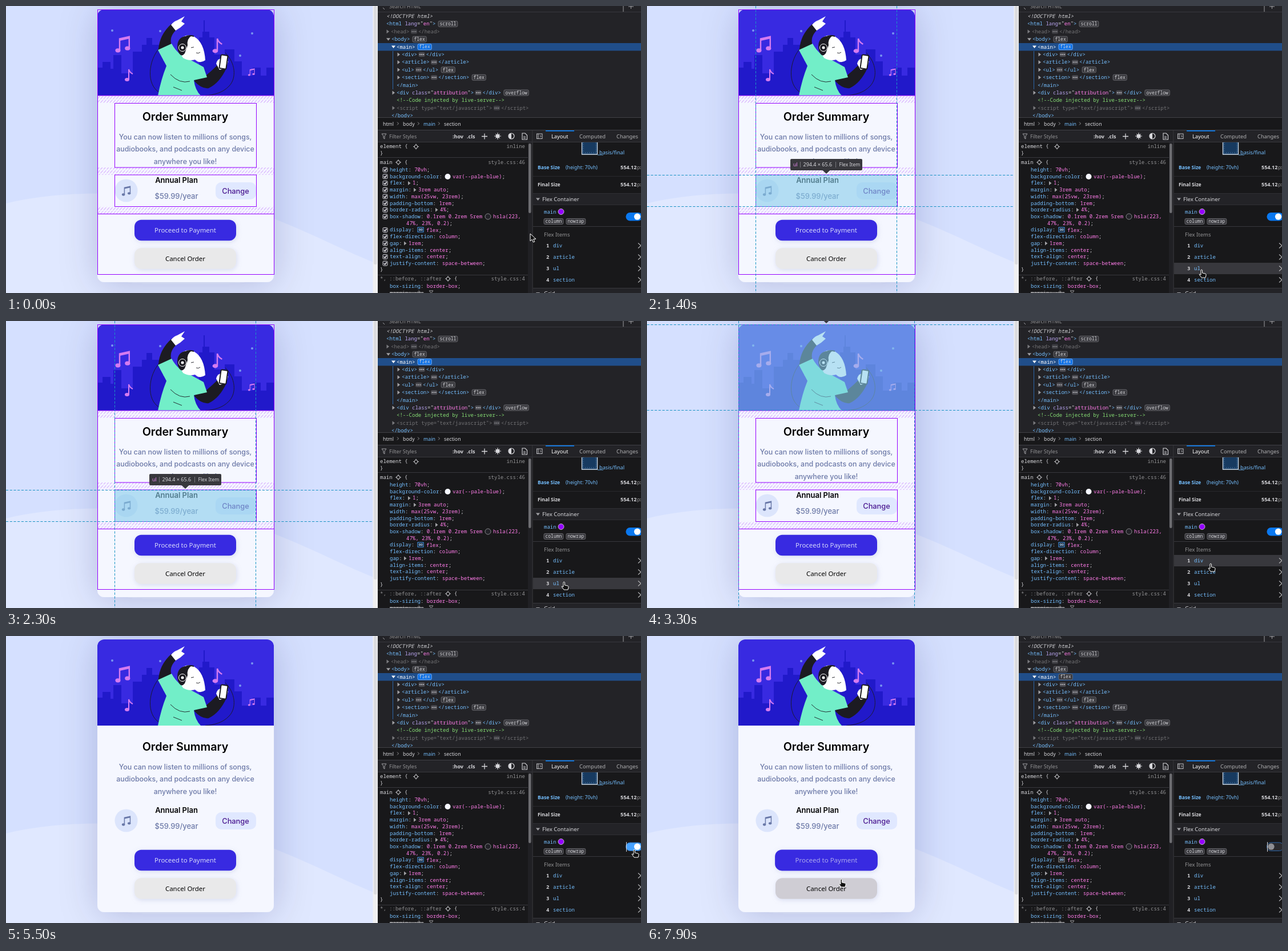
An HTML page for the animation above (8000 ms loop, 1112 by 503 pixels).

```html
<!DOCTYPE html>
<html lang="en">
<head>
<meta charset="utf-8">
<title>Flexbox inspector</title>
<style>
html, body { margin: 0; width: 100%; height: 100%; overflow: hidden; background: #18181a; }
svg { display: block; width: 1112px; height: 503px; }
text { white-space: pre; fill: #d7d7db; }
.mono { font: 9px "Noto Sans Mono", monospace; }
.tag { font: 8px "Noto Sans Mono", monospace; }
.ui { font: 9px "Noto Sans", sans-serif; }
.page { font: 500 12.4px Inter, sans-serif; text-anchor: middle; fill: #6d7aa8; }
.btn { font: 11.4px "Noto Sans", sans-serif; text-anchor: middle; }
</style>
</head>
<body>
<svg id="stage" viewBox="0 0 1112 503"></svg>
<script>
const COLORS = { b: '#75bfff', w: '#d7d7db', v: '#ff7de9', g: '#86de74', n: '#fff', d: '#939395', a: '#b9a4f0' };
const CHAR = 5.4;

const escapeText = s => s.replace(/&/g, '&amp;').replace(/</g, '&lt;');
const plain = s => s.replace(/~\w/g, '');
const rect = (x, y, w, h, fill, extra = '') =>
  `<rect x="${x}" y="${y}" width="${w}" height="${h}" fill="${fill}" ${extra}/>`;
const circle = (x, y, r, fill, extra = '') => `<circle cx="${x}" cy="${y}" r="${r}" fill="${fill}" ${extra}/>`;
const path = (d, fill = 'none', extra = '') => `<path d="${d}" fill="${fill}" ${extra}/>`;
const line = (d, color, width = 1, extra = '') => path(d, 'none', `stroke="${color}" stroke-width="${width}" ${extra}`);

// "~x" switches the colour of the following text.
function text(x, y, s, cls = 'mono', style = '') {
  const spans = s.split(/(?=~\w)/).map(part => part[0] === '~'
    ? `<tspan style="fill:${COLORS[part[1]]}">${escapeText(part.slice(2))}</tspan>` : escapeText(part));
  return `<text x="${x}" y="${y}" class="${cls}" style="${style}">${spans.join('')}</text>`;
}
const triangle = (x, y, open, fill = '#a0a0a4') => open
  ? path(`M${x - 3.5} ${y - 2}h7l-3.5 4.5z`, fill) : path(`M${x - 2} ${y - 3.5}v7l4.5 -3.5z`, fill);
const badge = (x, y, label, id = '') =>
  `<g ${id && `id="${id}"`}>` + rect(x, y - 5, label.length * 4.8 + 5, 10, '#38383d', 'rx="2" stroke="#77777c" stroke-width=".8"') +
  text(x + 2.5, y + 2.8, label, 'tag') + '</g>';

function note(x, y, scale, color, double) {
  const d = double
    ? 'M-5 8V-8L9 -11V5' : 'M0 9V-9Q2 -3 7 -1';
  return `<g transform="translate(${x} ${y}) scale(${scale})">` + line(d, color, 2) +
    (double ? line('M-5 -6.5L9 -9.5', color, 3) + `<ellipse cx="-7.5" cy="9" rx="3.8" ry="3" fill="${color}"/><ellipse cx="6.5" cy="6" rx="3.8" ry="3" fill="${color}"/>`
            : `<ellipse cx="-3" cy="9" rx="4" ry="3" fill="${color}"/>`) + '</g>';
}

function hero() {
  const ink = '#1c1b22', mint = '#72eec8', pink = '#d57bf0';
  return '<g clip-path="url(#cardClip)">' + rect(160, 6, 309, 151, '#382ae1') +
    path('M160 157V108H169V98H183V110H188V86H202V118H222V80H238V68H246V56H256V68H275V96H303V114H338V55H344V45H346V25H348V45H356V55H365V85H383V76H400V97H413V122H432V108H446V122H456V108H469V157Z', '#2119ca') +
    [[186, 43], [270, 44], [410, 87], [431, 48]].map(([x, y]) => circle(x, y, 2, '#7894f0')).join('') +
    note(205, 67, 1.2, pink, true) + note(215, 120, 1, pink) + note(370, 68, 1.2, pink) + note(430, 116, .55, pink, true) +
    line('M270 72C248 96 246 138 268 151C296 166 306 116 296 90M384 82C402 100 404 126 391 140C380 152 364 156 349 157', ink, .9) +
    path('M267 77Q268 51 290 31L298 42Q285 54 290 69L277 80Z', ink) +
    path('M289 33Q295 26 300 25L313 18L307 27L313 31Q306 38 297 43Z', '#fff') +
    path('M336 126L350 122Q362 112 373 101L386 109Q374 135 355 144Q343 146 329 131Z', ink) +
    path('M266 77L290 66Q302 88 324 95L346 107L352 125L329 130Q331 147 341 157H266Q272 127 281 105Z', mint) +
    path('M303 62Q313 46 330 54Q347 64 349 95Q339 102 331 94Q320 97 310 91Q300 76 303 62Z', '#fff') +
    path('M301 78Q297 57 313 53L325 52Q316 58 318 69L313 83Q306 92 301 78Z', ink) +
    line('M308 67Q311 48 329 53', ink, 2) + circle(309, 73, 6.5, ink, 'stroke="#fff" stroke-width="1"') + circle(309, 73, 2.5, '#fff') +
    line('M324 73l5 -1M333 82q4 2 7 -1M288 120q16 17 34 12M293 142l15 6', ink, .9) +
    path('M368 101Q370 92 378 92L389 97L385 109L374 112Z', '#fff') +
    rect(-6, -12, 12, 24, '#fff', `rx="2" stroke="${ink}" stroke-width="2" transform="translate(381 98) rotate(8)"`) +
    '</g>';
}

function page() {
  const button = (id, y, fill, label, color) => `<g id="${id}">` +
    rect(225, y, 178, 36.5, fill, 'rx="12" filter="url(#soft)"') + text(314, y + 22.6, label, 'btn', `fill:${color}`) + '</g>';
  return rect(0, 0, 643, 503, '#d5e0ff') +
    path('M0 346C60 331 130 327 200 329C320 333 400 346 470 373C540 401 590 428 643 449V503H0Z', '#e0e8ff') +
    rect(160, 6, 309, 478, '#f5f7ff', 'rx="12" filter="url(#cardShadow)"') + hero() +
    text(314, 201, 'Order Summary', 'page', 'font-size:19.7px;font-weight:600;fill:#000') +
    ['You can now listen to millions of songs,', 'audiobooks, and podcasts on any device', 'anywhere you like!']
      .map((s, i) => text(314, 234 + i * 21.3, s, 'page')).join('') +
    circle(210.5, 323.5, 20, '#dce5fc') + note(211, 324, .72, '#6978a8', true) +
    text(298.5, 310.3, 'Annual Plan', 'page', 'font-size:13px;font-weight:600;fill:#000') +
    text(298.5, 338, '$59.99/year', 'page', 'font-size:12.9px') +
    rect(367, 309, 71, 30, '#e0e8ff', 'rx="10"') + text(402, 328.5, 'Change', 'page', 'font-size:12.8px;fill:#4b1a91') +
    button('proceed', 374.7, '#382ae1', 'Proceed to Payment', '#d5d8fb') +
    button('cancel', 424.2, '#e9e9ea', 'Cancel Order', '#000') +
    rect(642.5, 0, 9, 503, '#f0f0f1') + rect(644, 0, 5.5, 453, '#dcdcdf', 'rx="2.5"');
}

function flexOverlay() {
  const boxes = [[160.5, 6.5, 309, 464], [160.5, 6.5, 309, 150.5], [190.5, 170.5, 248, 112.5], [190.5, 296, 248, 55.5], [160.5, 364.5, 309, 106]];
  return '<g id="flexLines">' +
    [157, 283, 351.5].map(y => rect(161, y, 308, 13, 'url(#hatch)')).join('') +
    boxes.map(b => rect(...b, 'none', 'stroke="#9400ff"')).join('') + '</g>';
}

function markup() {
  const rowY = i => 18 + i * 13.4;
  const node = (x, i, open, close, dim, tag) => {
    const y = rowY(i), dots = x + plain(open).length * CHAR + 2.5, end = dots + 13 + close.length * CHAR;
    return `<g ${dim ? 'opacity=".7"' : ''}>` + triangle(x - 5.5, y, false) + text(x, y + 3, open) +
      rect(dots, y - 4, 11, 8, '#4a4a50', 'rx="2"') +
      [2.5, 5.5, 8.5].map(d => circle(dots + d, y, .9, '#d7d7db')).join('') +
      text(dots + 13, y + 3, (dim ? '~d' : '~b') + close) + '</g>' + (tag ? badge(end + 5, y, tag) : '');
  };
  const row = (x, i, s, style) => text(x, rowY(i) + 3, s, 'mono', style);
  return rect(651, 0, 461, 196, '#232327') +
    text(671, 3.5, 'Search HTML', 'ui', 'fill:#939395') + line('M660 3l3 3M1090 1h9M1094.5 -4v9M1081 0v10', '#a0a0a4') +
    line('M651 10.5H1112', '#38383d') + rect(651, 65, 461, 13.4, '#204e8a') + line('M677.5 79V146', '#2c66a8') +
    row(666, 0, '<!DOCTYPE html>', 'font-style:italic') +
    row(666, 1, '~b<html ~alang~w="~ven~w"~b>') + badge(757, rowY(1), 'scroll') +
    node(674, 2, '~d<head>', '</head>', true) +
    triangle(669.5, rowY(3), true) + row(675, 3, '~b<body>') + badge(712, rowY(3), 'flex') +
    triangle(678.5, rowY(4), true, '#fff') + row(684, 4, '~n<main>') + badge(721, rowY(4), 'flex', 'mainBadge') +
    node(693, 5, '~b<div>', '</div>') + node(693, 6, '~b<article>', '</article>') +
    node(693, 7, '~b<ul>', '</ul>', false, 'flex') + node(693, 8, '~b<section>', '</section>', false, 'flex') +
    row(684, 9, '~b</main>') +
    node(684, 10, '~b<div ~aclass~w="~vattribution~w"~b>', '</div>', false, 'overflow') +
    row(684, 11, '~g<!--Code injected by live-server-->') +
    node(684, 12, '~d<script type="text/javascript">', '<\/script>', true) + row(675, 13, '~b</body>') +
    rect(651, 196, 461, 21, '#18181a') + line('M651 195.5H1112M651 217.5H1112', '#414146') +
    [[660, 'html'], [695, 'body'], [731, '~bmain'], [767, 'section']].map(([x, s]) => text(x, 209.5, s, 'ui', 'font-size:8.8px')).join('') +
    [686, 722, 758].map(x => line(`M${x - 1} 203.5l2.5 2.5l-2.5 2.5`, '#939395')).join('');
}

function rules() {
  const rows = ['~bheight~w: ~v70vh~w;', '~bbackground-color~w:', '~bflex~w:', '~bmargin~w:', '~bwidth~w: ~vmax(25vw, 23rem)~w;',
    '~bpadding-bottom~w: ~v1rem~w;', '~bborder-radius~w:', '~bbox-shadow~w: ~v0.1rem 0.2rem 5rem', '', '~bdisplay~w:',
    '~bflex-direction~w: ~vcolumn~w;', '~bgap~w:', '~balign-items~w: ~vcenter~w;', '~btext-align~w: ~vcenter~w;',
    '~bjustify-content~w: ~vspace-between~w;'];
  const rowY = i => 287 + i * 11.72;
  const expand = (i, x, s) => triangle(x - 6, rowY(i), false) + text(x, rowY(i) + 3, `~v${s}~w;`);
  const target = (x, y) => circle(x, y, 3, 'none', 'stroke="#c0c0c4"') + line(`M${x - 5} ${y}h3M${x + 2} ${y}h3M${x} ${y - 5}v3M${x} ${y + 2}v3`, '#c0c0c4');
  const check = y => rect(660, y - 4, 8, 8, '#2b2a33', 'rx="1.5" stroke="#d0d0d4"') + line(`M661.8 ${y}l1.8 2l3 -4.2`, '#fff', 1.3);
  return rect(651, 218, 271, 285, '#18181a') + rect(651, 218, 271, 20.5, '#232327') +
    path('M658 224h8l-3 4v5l-2 -1.5v-3.5z', 'none', 'stroke="#a0a0a4"') + text(671, 231.5, 'Filter Styles', 'ui', 'fill:#939395') +
    text(782, 231.5, ':hov', 'ui', 'font-weight:600') + text(807, 231.5, '.cls', 'ui', 'font-weight:600') +
    line('M833 228.5h10M838 223.5v10', '#d7d7db', 1.3) +
    circle(861, 228, 3.5, '#d7d7db') + line('M861 222v12M855 228h12M857 224l8 8M857 232l8 -8', '#d7d7db') +
    circle(885, 228, 5, 'none', 'stroke="#d7d7db" stroke-width="1.2"') + path('M885 223a5 5 0 0 0 0 10z', '#d7d7db') +
    path('M904 223h5l3.5 3.5v7.5h-8.5zM906 229h4M906 231.5h4', 'none', 'stroke="#d7d7db" stroke-width="1.1"') +
    line('M651 238.5H922M651 265.5H914M651 471.5H914', '#38383d') +
    text(655, 249, 'element {') + target(718, 246.5) + text(909, 249, '~dinline', 'mono', 'text-anchor:end') + text(655, 261, '}') +
    text(655, 277, 'main') + target(687, 274) + text(698, 277, '{') + text(909, 277, '~dstyle.css:46', 'mono', 'text-anchor:end') +
    rows.map((s, i) => text(672, rowY(i) + 3, s)).join('') +
    circle(773.5, 299, 5, '#f5f7ff') + text(782, 301.7, '~vvar(--pale-blue)~w;') +
    expand(2, 712, '1') + expand(3, 722, '3rem auto') + expand(6, 760, '4%') + expand(11, 705, '1rem') +
    circle(844, 369, 5, '#222228', 'stroke="#a0a0a4" stroke-width=".8"') + text(853, 372, '~vhsla(223,') + text(701, 383.8, '~v47%, 23%, 0.2)~w;') +
    rect(721, 388, 10, 8, 'none', 'id="flexIcon" stroke-width="1"') + line('M723.5 390.5h2v3h-2zM727 390.5h2v3h-2z', '#9cc8f5') + text(736, 395.5, '~vflex~w;') +
    '<g id="checks">' + rows.map((s, i) => s && check(rowY(i))).join('') + '</g>' +
    text(655, 465, '}') + text(655, 481, '~d*, ::before, ::after') + target(774, 478) + text(785, 481, '{') +
    text(909, 481, '~dstyle.css:4', 'mono', 'text-anchor:end') + text(672, 494, '~bbox-sizing~w: ~vborder-box~w;') +
    text(672, 505.5, '~dmargin: ▸0;', 'mono', 'text-decoration:line-through') + path('M741 499h7l-2.5 3v4h-2v-4z', 'none', 'stroke="#a0a0a4"') +
    rect(914, 239, 7, 264, '#202024') + rect(915, 241, 4.5, 122, '#6c6c70', 'rx="2.2"') + rect(921.5, 218, 1.2, 285, '#414146');
}

function layout() {
  const ui = (x, y, s, style = '') => text(x, y, s, 'ui', style);
  const size = (y, label, color) => ui(931, y, label, `font-weight:700;font-size:8.6px;fill:${color}`) +
    ui(1076, y, '554.12', 'font-weight:600') + ui(1105, y, 'px', 'fill:#939395');
  return rect(922.7, 218, 190, 285, '#18181a') + rect(922.7, 218, 190, 20.5, '#232327') +
    rect(945, 218, 50, 1.6, '#0a84ff') + line('M923 238.5H1112', '#38383d') +
    rect(929.5, 224, 9.5, 8.5, 'none', 'stroke="#c0c0c4"') + line('M932 224v8.5M935 226.3l2 2l-2 2', '#c0c0c4') +
    ui(955, 231.7, 'Layout', 'fill:#fff;font-size:9.3px') + ui(1004, 231.7, 'Computed', 'font-size:9.3px;fill:#b1b1b3') + ui(1069, 231.7, 'Changes', 'font-size:9.3px;fill:#b1b1b3') +
    rect(1008, 239, 28, 21, '#173a60') + line('M1008.5 239V260H1035.5V239', '#c8d8e8', 1.4) +
    line('M1011 239V257H1033V239', '#5e93c4', .8, 'stroke-dasharray="1.5 2"') +
    ui(1039, 260, 'basis/final', 'font-size:9.2px;fill:#75bfff') + line('M1036 261H1046', '#75bfff', .8) +
    size(286.3, 'Base Size', '#75bfff') + ui(980, 286.3, '(height: 70vh)', 'font-size:8.7px;fill:#75bfff') +
    line('M923 298.5H1112', '#29292d') + size(315.8, 'Final Size', '#d7d7db') +
    rect(923, 329, 189, 19, '#232327') + line('M923 328.5H1112M923 348.5H1112', '#2f2f34') +
    triangle(931.5, 338.5, true) + ui(939, 341.7, 'Flex Container', 'font-size:9.6px') +
    text(942, 363.8, '~bmain') + circle(972, 360.5, 5, '#9400ff', 'stroke="#ddd" stroke-width=".8"') +
    badge(942, 377.5, 'column') + badge(981, 377.5, 'nowrap') + line('M923 386.5H1112', '#38383d') +
    ui(942, 404, 'Flex Items', 'font-size:9.5px;fill:#939395') + rect(923, 0, 189, 20, '#38383d', 'id="rowLight"') +
    ['div', 'article', 'ul', 'section'].map((s, i) => text(946, 423 + i * 20, i + 1 + '', 'mono', 'font-weight:600') +
      text(958, 423 + i * 20, '~b' + s) + line(`M1107 ${415.5 + i * 20}l5 4.5l-5 4.5`, '#b1b1b3', 1.2)).join('') +
    rect(923, 495, 189, 8, '#232327') + line('M923 494.5H1112', '#38383d') + triangle(931.5, 504, true) + ui(942, 507, 'Grid', 'font-size:9.6px') +
    rect(1085.5, 362, 29, 14.5, '', 'id="pill" rx="7.2" stroke-width="1"') + circle(0, 369.2, 5.6, '', 'id="knob"') +
    rect(1086, 361, 1, 17, '#d7d7db', 'id="caret"');
}

const defs = `<defs>
  <filter id="cardShadow" x="-50%" y="-40%" width="200%" height="180%"><feDropShadow dx="1.3" dy="2.7" stdDeviation="33" flood-color="#1f2f56" flood-opacity=".2"/></filter>
  <filter id="soft" x="-10%" y="-40%" width="120%" height="180%"><feDropShadow dx="1" dy="2" stdDeviation="4" flood-color="#8791c8" flood-opacity=".28"/></filter>
  <clipPath id="cardClip"><path d="M160 157V18a12 12 0 0 1 12 -12H457a12 12 0 0 1 12 12V157z"/></clipPath>
  <clipPath id="pageClip"><path d="M0 0H642V503H0z"/></clipPath>
  <pattern id="hatch" width="5.5" height="6.5" patternUnits="userSpaceOnUse" y="157"><path d="M.5 6L5 1" stroke="#b04dff" stroke-width=".9" opacity=".75"/></pattern>
</defs>`;
const arrow = path('M0 0V13L3.2 10.2L5.4 15L7.8 14L5.6 9.4H10Z', '#111', 'id="arrow" stroke="#fff" stroke-width="1"');
const hand = path('M-1 1Q0 -1 1.5 1V6L7 7.2Q8.5 8 8 10L7 14H0L-4 8.5Q-3.5 7 -1 9Z', '#111', 'id="hand" stroke="#fff" stroke-width="1"');

const stage = document.getElementById('stage');
stage.innerHTML = defs + page() + flexOverlay() + '<g id="highlight" clip-path="url(#pageClip)"></g>' +
  markup() + rules() + layout() + `<g id="cursor">${arrow}${hand}</g>`;
const $ = id => document.getElementById(id);
const set = (id, attrs) => { for (const k in attrs) $(id).setAttribute(k, attrs[k]); };
const show = (id, on) => set(id, { visibility: on ? 'visible' : 'hidden' });

// name, tag width, size label, left, top, right, bottom
const ITEMS = [
  ['div', 13, '368 × 179.6', 160.5, 6.5, 468.5, 156.5],
  ['article', 27, '294.4 × 133.8', 190.5, 170.5, 437.5, 282.5],
  ['ul', 8, '294.4 × 65.6', 190.5, 296.5, 437.5, 351.5],
  ['section', 30, '368 × 126.1', 160.5, 364.5, 468.5, 470.5],
];
function highlight([name, tagWidth, size, left, top, right, bottom]) {
  const sizeWidth = size.length * 4.25, width = tagWidth + sizeWidth + 67;
  const x = 314 - width / 2, y = top - 28.5, mid = x + tagWidth + 9.5, last = mid + sizeWidth + 11;
  return rect(left, top, right - left, bottom - top, '#87ceeb', 'opacity=".6"') +
    line(`M0 ${top}H642M0 ${bottom}H642M${left} 0V503M${right} 0V503`, '#1a93c4', 1, 'stroke-dasharray="4.2 2.5"') +
    rect(x, y, width, 20, '#38383d', 'rx="2"') + path(`M307.5 ${y + 20}h13l-6.5 6z`, '#38383d') +
    line(`M${mid} ${y + 5}v10M${last} ${y + 5}v10`, '#77777c') +
    text(x + 5, y + 13, name, 'ui', 'fill:#e287e8') + text(mid + 5, y + 13, size, 'ui') + text(last + 6, y + 13, 'Flex Item', 'ui', 'font-size:8.5px');
}

// time, x, y
const TRACK = [[0, 918, 399], [100, 942, 402], [200, 942, 402], [300, 957, 414], [500, 976, 424], [800, 976, 424], [1000, 973, 429],
  [1100, 974, 445], [1300, 972, 457], [1500, 970, 467], [1700, 971, 478], [2000, 974, 490], [2100, 975, 484], [2300, 977, 457],
  [2500, 979, 441], [3200, 979, 441], [3300, 987, 425], [3600, 987, 425], [3800, 977, 433], [4100, 977, 433], [4200, 975, 432],
  [4300, 975, 432], [4400, 1057, 386], [5000, 1100, 374], [6200, 1100, 374], [6300, 1062, 368], [6400, 960, 362], [6500, 636, 358],
  [6600, 523, 358], [6800, 523, 362], [7300, 344, 388], [7600, 344, 388], [7900, 340, 426], [8000, 340, 426]];
function cursorAt(t) {
  const i = TRACK.findIndex(key => key[0] > t), [t0, x0, y0] = TRACK[i - 1], [t1, x1, y1] = TRACK[i];
  const k = (t - t0) / (t1 - t0);
  return [x0 + (x1 - x0) * k, y0 + (y1 - y0) * k];
}

let lastRow;
function draw(t) {
  const [x, y] = cursorAt(t);
  const row = x > 922 && y >= 410 && y < 490 ? Math.floor((y - 410) / 20) : -1;
  const flexOn = t < 5600, overToggle = x > 1084;
  const overProceed = x > 225 && x < 403 && y > 375 && y < 411, overCancel = x < 403 && y > 424;
  if (row !== lastRow) $('highlight').innerHTML = row < 0 ? '' : highlight(ITEMS[row]);
  lastRow = row;
  show('rowLight', row >= 0);
  set('rowLight', { y: 410 + row * 20 });
  show('flexLines', t < 5500);
  show('checks', t < 100);

  const badgeBox = $('mainBadge').firstChild;
  badgeBox.setAttribute('fill', flexOn ? '#0a6fe8' : '#38383d');
  badgeBox.setAttribute('stroke', flexOn ? '#8cc0ff' : '#77777c');
  set('flexIcon', { stroke: flexOn ? '#45a1ff' : '#a0a0a4' });
  set('pill', { fill: !flexOn ? '#2a2a2e' : overToggle ? '#45a1ff' : '#0a78f0', stroke: t < 5500 ? 'none' : '#2c66a8' });
  set('knob', { cx: flexOn ? 1105.5 : 1093, fill: flexOn ? '#fff' : '#8f8f94' });
  show('caret', t >= 5500 && (t < 7700 || t >= 7900));

  const hot = overProceed || t >= 7700;
  set('proceed', { transform: hot ? 'translate(314 393) scale(1.01) translate(-314 -393)' : '' });
  $('proceed').lastChild.style.fill = hot ? '#aaa6ee' : '#d5d8fb';
  $('cancel').firstChild.setAttribute('fill', overCancel ? '#cfcdd4' : '#e9e9ea');

  const pointing = x > 922 && y >= 410 || overToggle || overProceed || overCancel;
  show('hand', pointing);
  show('arrow', !pointing);
  set('cursor', { transform: `translate(${x} ${y})` });
}

function tick() {
  draw(Math.floor(performance.now() % 8000 / 100) * 100);
  requestAnimationFrame(tick);
}
tick();
</script>
</body>
</html>
```
